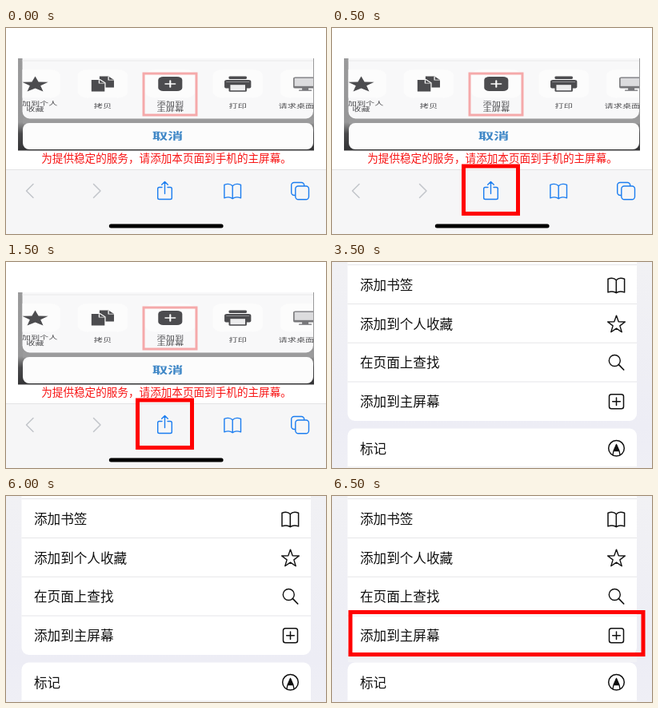
These frames come from a looping animation (400x258 px, 8 s). An HTML page with a canvas:

```html
<!DOCTYPE html>
<html lang="zh-CN">
<head>
<meta charset="utf-8">
<style>
html, body { margin: 0; width: 100%; height: 100%; overflow: hidden; background: #fff; }
canvas { display: block; width: 400px; height: 258px; }
</style>
</head>
<body>
<canvas id="stage"></canvas>
<script>
const W = 400, H = 258, LOOP = 8000;
const FONT = '"Noto Sans CJK SC", "Noto Sans CJK", sans-serif';
const BLUE = '#1b7df0', RED = '#ff0000', DARK = '#4c4c4f', TILE = '#fcfcfc', INK = '#101010';
const canvas = document.getElementById('stage');
const ctx = canvas.getContext('2d');
const ratio = window.devicePixelRatio || 1;
canvas.width = W * ratio;
canvas.height = H * ratio;

function rect(x, y, w, h, color) {
  ctx.fillStyle = color;
  ctx.fillRect(x, y, w, h);
}

function round(x, y, w, h, r, color) {
  ctx.beginPath();
  ctx.roundRect(x, y, w, h, r);
  ctx.fillStyle = color;
  ctx.fill();
}

function roundLine(x, y, w, h, r, color, width) {
  ctx.beginPath();
  ctx.roundRect(x, y, w, h, r);
  ctx.strokeStyle = color;
  ctx.lineWidth = width;
  ctx.stroke();
}

function line(path, color, width) {
  ctx.strokeStyle = color;
  ctx.lineWidth = width;
  ctx.stroke(new Path2D(path));
}

function fill(path, color) {
  ctx.fillStyle = color;
  ctx.fill(new Path2D(path));
}

// Outer edges are given; the stroke lies inside them.
function frame(x1, y1, x2, y2, width, color) {
  ctx.strokeStyle = color;
  ctx.lineWidth = width;
  ctx.lineJoin = 'miter';
  ctx.strokeRect(x1 + width / 2, y1 + width / 2, x2 - x1 - width, y2 - y1 - width);
  ctx.lineJoin = 'round';
}

function label(text, x, midY, size, color, align = 'left', weight = 400) {
  ctx.font = `${weight} ${size}px ${FONT}`;
  ctx.textAlign = align;
  ctx.fillStyle = color;
  ctx.fillText(text, x, midY + size * 0.38);
}

function gradient(...stops) {
  const paint = ctx.createLinearGradient(0, 0, 0, H);
  stops.forEach(([y, color]) => paint.addColorStop(y / H, color));
  return paint;
}

function star(cx, cy, outer, inner) {
  const points = Array.from({ length: 10 }, (_, i) => {
    const r = i % 2 ? inner : outer, a = (i / 5 - 0.5) * Math.PI;
    return `${cx + r * Math.cos(a)} ${cy + r * Math.sin(a)}`;
  });
  return `M${points.join('L')}Z`;
}

function at(x, y, draw, sx = 1) {
  ctx.save();
  ctx.translate(x, y);
  ctx.scale(sx, 1);
  draw();
  ctx.restore();
}

function book(x, y, color, width) {
  at(x, y, () => line('M0-6.8C-2.5-9.4-6.5-9.6-10.3-8.2V8.4C-6.5 7-2.5 7.2 0 9.2C2.5 7.2 6.5 7 10.3 8.4V-8.2C6.5-9.6 2.5-9.4 0-6.8V9', color, width));
}

// Share sheet entries; icons are centred on the origin, before squashing.
const sheetItems = [
  [['添加到个人', '收藏'], () => fill(star(0, 1, 10.6, 4.4), DARK)],
  [['拷贝'], () => {
    fill('M-2.5-9.5H4.5L8.8-5V4.5H-2.5Z', DARK);
    fill('M-9.6-6H-2L2.3-1.5V10.3H-9.6Z', TILE);
    fill('M-8.8-5H-2.5L1.5-1V9.5H-8.8Z', DARK);
    line('M-2.8-4.5V-.8H1M4.5-9V-4.8H8.5', TILE, 0.8);
  }],
  [['添加到', '主屏幕'], () => {
    round(-9.4, -9, 18.8, 18, 4, DARK);
    line('M-3.8 0H3.8M0-4V4', TILE, 1.3);
  }],
  [['打印'], () => {
    round(-7, -9.5, 14, 3.6, 1, DARK);
    round(-10.4, -5, 20.8, 10.5, 2, DARK);
    round(-7, 0, 14, 9.7, 1, DARK);
    rect(-5.8, 1.2, 11.6, 7, '#ececed');
    rect(-9, -3, 18, 1, '#8d8d90');
  }],
  [['请求桌面网站'], () => {
    round(-9.4, -8.5, 18.8, 14, 1.5, '#77777a');
    rect(-8.4, -7.2, 16.8, 10, '#dcdcde');
    rect(-2.5, 5, 5, 3, '#77777a');
    rect(-5, 7.5, 10, 1.3, '#77777a');
  }]
];

function shareSheet() {
  const squash = 1.6;
  rect(15, 38, 370, 115.5, gradient([38, '#9a9a9b'], [118, '#979798'], [132, '#4a4a4c'], [154, '#333335']));
  rect(21, 112, 363, 8, '#9b9b9c');
  ctx.save();
  ctx.beginPath();
  ctx.roundRect(20.5, 38, 363.5, 75.5, [0, 0, 9, 9]);
  ctx.clip();
  rect(15, 38, 370, 76, '#f8f8f9');
  rect(15, 40.5, 370, 1, '#ececec');
  sheetItems.forEach(([lines, icon], i) => {
    at(36.5 + i * 84.4, 0, () => {
      round(-19.5, 52, 39, 35.5, 8, TILE);
      at(0, 70, icon);
      const firstY = lines.length > 1 ? 94 : 97.8;
      lines.forEach((text, n) => label(text, 0, firstY + n * 7.5, 7, DARK, 'center', 500));
    }, squash);
  });
  ctx.restore();
  round(21, 119, 363, 33, 8, '#fcfcfc');
  at(202, 135, () => label('取消', 0, 0, 12.1, '#3d86c6', 'center', 700), squash);
  frame(170.5, 55.5, 239.5, 110.5, 3, '#f5a9aa');
}

function toolbar() {
  rect(0, 177, W, 81, '#f6f6f7');
  rect(0, 177, W, 1, '#e3e3e4');
  line('M34 195.5L25.5 204L34 212.5M109.5 195.5L118 204L109.5 212.5', '#c2c5ca', 1.5);
  line('M195 199.5H191.5Q189.7 199.5 189.7 201.3V212.7Q189.7 214.5 191.5 214.5H205.5Q207.3 214.5 207.3 212.7V201.3Q207.3 199.5 205.5 199.5H202M198.5 207.5V192.5M194.7 196.2L198.5 192.4L202.3 196.2', BLUE, 1.4);
  book(283.2, 204.5, BLUE, 1.4);
  roundLine(356.7, 193.5, 16, 16, 3.5, BLUE, 1.4);
  round(361.8, 198, 16.7, 16.7, 3.5, '#f6f6f7');
  roundLine(361.8, 198, 16.7, 16.7, 3.5, BLUE, 1.4);
  round(128.8, 245.4, 142.8, 5, 2.5, '#000');
}

function shareScene(marked) {
  rect(0, 0, W, H, '#fff');
  shareSheet();
  label('为提供稳定的服务，请添加本页面到手机的主屏幕。', 44.2, 162.8, 13.6, '#f81414');
  toolbar();
  if (marked) frame(162, 170.5, 235, 235, 5, RED);
}

function menuScene(marked) {
  rect(0, 0, W, H, gradient([0, '#f1f1f4'], [206, '#ededf5'], [H, '#efeff5']));
  round(19.5, -20, 361.5, 219, 9, '#fff');
  round(19.5, 208.5, 361.5, 70, 9, '#fff');
  [3, 52, 100.7, 149.5, 256.5].forEach(y => rect(19.5, y, 361.5, 1, '#e6e6e9'));
  const rows = { 添加书签: 28.5, 添加到个人收藏: 77.3, 在页面上查找: 126, 添加到主屏幕: 174.7, 标记: 233.3 };
  for (const [text, y] of Object.entries(rows)) label(text, 35, y, 16.6, INK);

  book(355.3, 29.5, INK, 1.5);
  line(star(355.5, 78.5, 11.4, 4.6), INK, 1.4);
  ctx.beginPath();
  ctx.arc(353.3, 123.5, 7, 0, Math.PI * 2);
  ctx.stroke();
  line('M358.5 128.7L364.7 135', INK, 1.7);
  roundLine(346.5, 165.8, 18, 18, 2.8, INK, 1.5);
  line('M350.7 174.8H360.3M355.5 170V179.6', INK, 1.5);
  ctx.beginPath();
  ctx.arc(355.5, 233.3, 9.8, 0, Math.PI * 2);
  ctx.stroke();
  line('M351 241.5L352 236.5L355.5 228.5L359 236.5L360 241.5M352 236.5H359', INK, 1.3);
  fill('M355.5 227.5L359 236.5H352Z', INK);
  if (marked) {
    rect(20, 199, 361, 9, '#f2f2f6');
    frame(20.5, 143, 391.5, 201, 5, RED);
  }
}

function draw(now) {
  const t = now % LOOP;
  ctx.setTransform(ratio, 0, 0, ratio, 0, 0);
  ctx.lineCap = ctx.lineJoin = 'round';
  if (t < 3500) shareScene(t >= 1500 || (t >= 500 && t < 1000));
  else menuScene(t >= 6500 || (t >= 5500 && t < 6000));
}

const start = performance.now();
function tick() {
  draw(performance.now() - start);
  requestAnimationFrame(tick);
}
tick();
</script>
</body>
</html>
```
